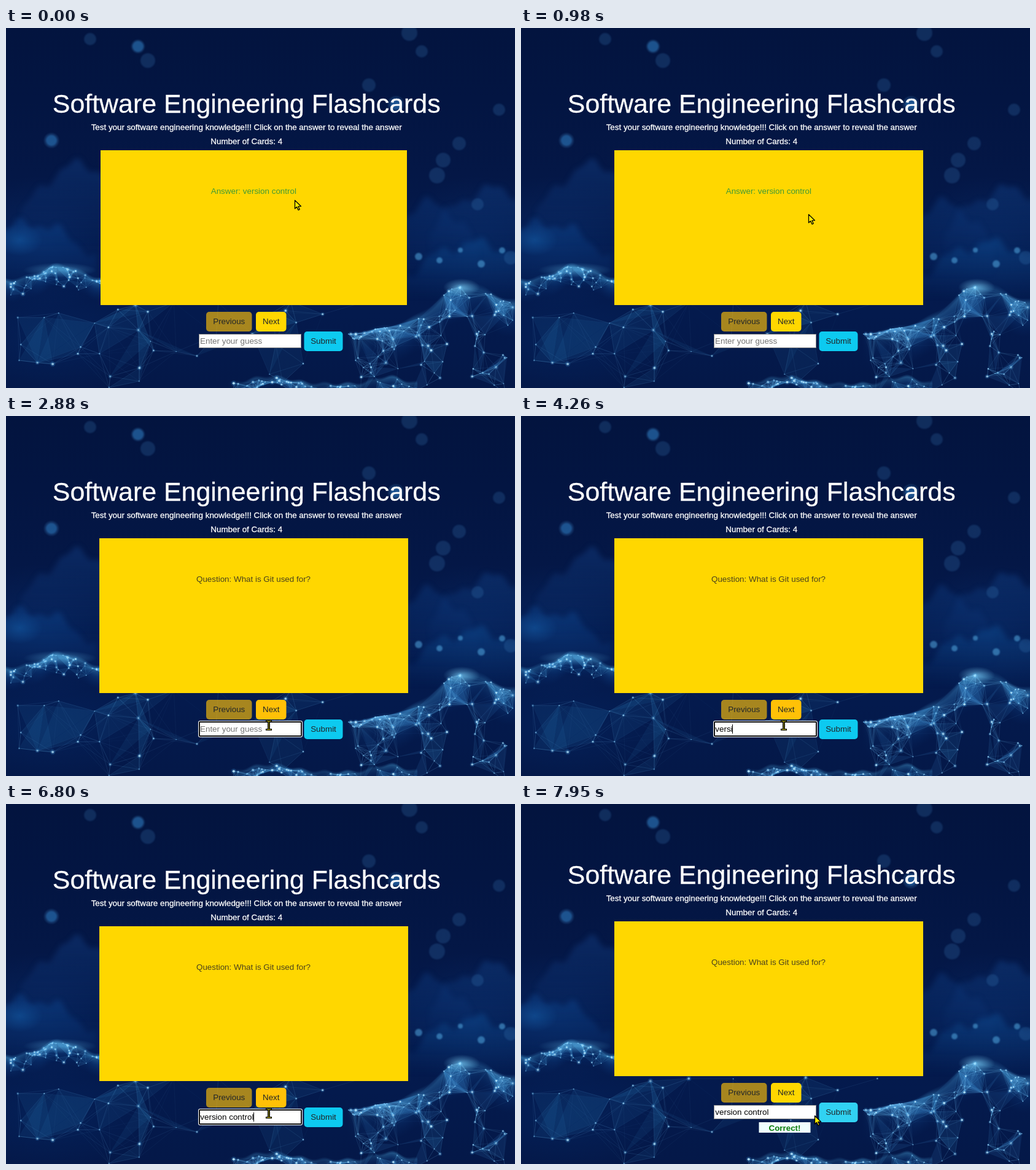
Write an HTML page with a canvas that moves like this. It is 829 by 586 pixels and loops after 8000 ms.

```html
<!DOCTYPE html>
<html lang="en">
<head>
<meta charset="utf-8">
<title>Software Engineering Flashcards</title>
<style>
html, body { margin: 0; width: 100%; height: 100%; overflow: hidden; background: #03153f; }
canvas { display: block; }
</style>
</head>
<body>
<canvas id="stage" width="829" height="586"></canvas>
<script>
const W = 829, H = 586, LOOP = 8000;
const ctx = document.getElementById('stage').getContext('2d');
const FONT = '"Liberation Sans", Arial, sans-serif';
const GOLD = '#ffd700', AMBER = '#ffc107', INK = '#212529', WHITE = '#fff';
const clamp = v => Math.max(0, Math.min(1, v));
const mix = (a, b, u) => a + (b - a) * u;

// ---------- backdrop ----------
function rng(seed) {
  return () => {
    seed = (seed * 1664525 + 1013904223) >>> 0;
    return seed / 4294967296;
  };
}

function trace(g, pts) {
  g.beginPath();
  for (const p of pts) g.lineTo(...p);
}

function dot(g, x, y, r, color) {
  g.fillStyle = color;
  g.beginPath();
  g.arc(x, y, r, 0, 7);
  g.fill();
}

function haze(g, x, y, rx, ry, rgb, a) {
  g.save();
  g.translate(x, y);
  g.scale(rx, ry);
  const fill = g.createRadialGradient(0, 0, 0, 0, 0, 1);
  fill.addColorStop(0, `rgba(${rgb},${a})`);
  fill.addColorStop(1, `rgba(${rgb},0)`);
  dot(g, 0, 0, 1, fill);
  g.restore();
}

// Wave surfaces: x span, height rule, depth of the net below the crest
const bump = (x, mid, width) => Math.exp(-(((x - mid) / width) ** 2));
const waves = [
  { from: 0, to: 215, depth: 34, count: 75, reach: 20, glow: 0.5, seed: 21,
    y: x => 412 - 24 * bump(x, 88, 42) + 2 * Math.sin(x / 7) },
  { from: 555, to: 829, depth: 150, count: 125, reach: 44, glow: 0.42, seed: 8,
    y: x => mix(500, 452, (x - 555) / 274) - 48 * bump(x, 744, 58) + 2 * Math.sin(x / 9) },
  { from: 360, to: 670, depth: 24, count: 65, reach: 28, glow: 0.4, seed: 3,
    y: x => 582 - 12 * bump(x, 430, 45) - 12 * bump(x, 622, 30) + 2 * Math.sin(x / 6) }
];

function surface(g, w) {
  const depth = Math.min(w.depth, 58);
  for (let x = w.from; x < w.to; x++) {
    const y = w.y(x);
    const edge = w.from ? clamp((x - w.from) / 60) : 1;
    const a = w.glow * edge * (0.75 + 0.25 * Math.sin(x / 13 + w.seed));
    const fill = g.createLinearGradient(0, y - 5, 0, y + depth);
    fill.addColorStop(0, 'rgba(70,160,220,0)');
    fill.addColorStop(0.15, `rgba(75,170,225,${a})`);
    fill.addColorStop(0.5, `rgba(25,95,170,${a * 0.6})`);
    fill.addColorStop(1, 'rgba(10,60,130,0)');
    g.fillStyle = fill;
    g.fillRect(x, y - 5, 1, depth + 5);
  }
}

function mesh(g, seed, count, reach, alpha, place) {
  const rnd = rng(seed);
  const pts = Array.from({ length: count }, () => place(rnd));
  const gap = (p, q) => Math.hypot(p[0] - q[0], p[1] - q[1]);
  g.lineWidth = 0.8;
  pts.forEach((p, i) => {
    const near = pts.slice(0, i).filter(q => gap(p, q) < reach);
    for (const q of near) {
      g.strokeStyle = `rgba(110,185,235,${alpha * (1.1 - gap(p, q) / reach)})`;
      trace(g, [p, q]);
      g.stroke();
    }
    if (near.length > 1) {
      g.fillStyle = `rgba(60,150,215,${alpha * 0.25})`;
      trace(g, [p, near[0], near[1]]);
      g.fill();
    }
  });
  for (const [x, y] of pts) {
    const r = 0.6 + 1.6 * rnd() ** 2;
    dot(g, x, y, r * 2, 'rgba(70,165,235,.22)');
    dot(g, x, y, r, `rgba(185,232,255,${0.4 + rnd() * 0.5})`);
  }
}

// Soft distant range with a rough top
function range(g, x0, x1, top, height, rgb, seed) {
  const pts = [[x0, top + height]];
  for (let x = x0; x <= x1; x += 8) {
    const arch = Math.sin(Math.PI * (x - x0) / (x1 - x0));
    pts.push([x, top + height * (1 - arch) * 0.6 + 8 * Math.sin(x / 11 + seed) + 5 * Math.sin(x / 5)]);
  }
  pts.push([x1, top + height]);
  const fill = g.createLinearGradient(0, top, 0, top + height);
  fill.addColorStop(0, `rgba(${rgb},.42)`);
  fill.addColorStop(1, `rgba(${rgb},0)`);
  g.filter = 'blur(4px)';
  g.fillStyle = fill;
  trace(g, pts);
  g.fill();
  g.filter = 'none';
}

function paintBackdrop() {
  const c = document.createElement('canvas');
  c.width = W;
  c.height = H;
  const g = c.getContext('2d');
  const sky = g.createLinearGradient(0, 0, 0, H);
  ['#03143f', '#031542', '#041746', '#04194b', '#041a4d', '#041848']
    .forEach((s, i) => sky.addColorStop(i / 5, s));
  g.fillStyle = sky;
  g.fillRect(0, 0, W, H);

  for (const x of [60, 770]) haze(g, x, 350, 150, 110, '12,60,130', 0.3);
  haze(g, 22, 345, 38, 26, '25,105,180', 0.5);
  haze(g, 70, 510, 170, 90, '5,45,110', 0.35);
  range(g, 25, 215, 222, 130, '20,65,135', 1);
  range(g, -70, 150, 318, 100, '16,75,150', 3);
  range(g, 690, 900, 262, 110, '18,65,135', 2);
  range(g, 610, 770, 285, 120, '14,58,125', 5);
  range(g, 650, 880, 350, 90, '16,80,150', 4);

  // Out-of-focus lights
  const lights = [
    [137, 18], [215, 30], [231, 53], [657, 8], [677, 38], [591, 93], [74, 183],
    [635, 124], [803, 133], [738, 188], [712, 215], [702, 240], [768, 287], [822, 374]
  ];
  g.filter = 'blur(1px)';
  lights.forEach(([x, y], i) => dot(g, x, y, 10 + i % 4, 'rgba(60,125,190,.24)'));
  for (const [x, y] of [[215, 30], [74, 183], [635, 124]]) dot(g, x, y, 9, 'rgba(50,145,220,.38)');
  for (let i = 0; i < 5; i++)
    dot(g, 672 + i * 34, 372 + 12 * Math.sin(i * 2.6), 6 - i % 3, 'rgba(90,180,235,.5)');
  g.filter = 'none';

  mesh(g, 11, 38, 90, 0.32, r => [r() * 600, 440 + r() * 146]);
  for (const w of waves) {
    surface(g, w);
    mesh(g, w.seed, w.count, w.reach, 0.45, r => {
      const x = mix(w.from, w.to, r());
      return [x, w.y(x) + w.depth * r() ** 2.2];
    });
  }
  haze(g, 742, 422, 30, 14, '130,215,255', 0.6);
  haze(g, 88, 394, 60, 12, '110,205,250', 0.4);
  return c;
}

// ---------- interface ----------
function text(str, x, y, color, size = 13.4, align = 'center', weight = '') {
  ctx.font = `${weight} ${size}px ${FONT}`;
  ctx.textAlign = align;
  ctx.fillStyle = color;
  ctx.fillText(str, x, y);
  if (color === WHITE) {
    ctx.strokeStyle = color;
    ctx.lineWidth = 0.3;
    ctx.strokeText(str, x, y);
  }
}

function rect(x, y, w, h, color, r = 0) {
  ctx.fillStyle = color;
  ctx.beginPath();
  ctx.roundRect(x, y, w, h, r);
  ctx.fill();
}

function button(label, x, y, w, color, alpha = 1) {
  ctx.globalAlpha = alpha;
  rect(x, y, w, 32, color, 5);
  ctx.globalAlpha = 1;
  text(label, x + w / 2, y + 20, INK);
}

const WORD = 'version control';
const FLIP = 1260, FOCUS = 2020, TYPE = 3160, TYPED = 6260, LEAVE = 6950, BLUR = 7250, SOLVED = 7490;
const STROKE = (TYPED - TYPE) / (WORD.length - 1);

function caretOn(t) {
  const since = t < TYPE ? FOCUS + 300 : TYPED;
  return t >= FOCUS + 300 && t < BLUR && (t - since < 550 || t - since > 1100);
}

function drawInput(t) {
  const focused = t >= FOCUS && t < BLUR;
  if (focused) {
    rect(313, 496, 170, 27, WHITE, 3);
    rect(314, 497, 168, 25, '#101010', 2);
    rect(316, 499, 164, 21, WHITE);
  } else {
    rect(314, 498, 167, 23, '#858585');
    rect(315, 499, 165, 21, WHITE);
  }
  const count = t < TYPE ? 0 : Math.floor((t - TYPE) / STROKE + 1.001);
  const typed = WORD.slice(0, count);
  if (typed) text(typed, 316.3, 513.5, '#000', 13.4, 'left');
  else text('Enter your guess', 316, 513.5, '#757575', 13.4, 'left');
  if (caretOn(t)) rect(Math.floor(316.3 + ctx.measureText(typed).width), 502, 1, 15, '#000');
}

function outline(pts) {
  trace(ctx, pts);
  ctx.closePath();
  ctx.lineJoin = 'round';
  ctx.lineWidth = 1.3;
  ctx.strokeStyle = '#000';
  ctx.fillStyle = '#ffee00';
  ctx.fill();
  ctx.stroke();
}

const cursors = {
  arrow() {
    outline([[0.5, 0.5], [0.5, 14], [3.6, 11.2], [6, 16.3], [8.2, 15.3], [6, 10.4], [10.5, 10.2]]);
  },
  beam() {
    for (const y of [-8, 6]) rect(-5, y, 10, 3, '#000');
    rect(-2, -7, 4, 15, '#000');
    rect(-0.5, -7, 1, 15, '#c8bc00');
    for (const y of [-7, 7]) rect(-4, y, 8, 1, '#c8bc00');
  },
  hand() {
    outline([[4, 1], [6.5, 1], [6.8, 6], [11.6, 7], [13.4, 8.5], [13.5, 12], [11.8, 18.5], [4.8, 18.5], [1, 11.5], [1, 9.5], [4, 11]]);
    for (const x of [6.4, 9.2]) rect(x, 6.5, 1, 3.5, '#000');
  }
};

function pointer(t) {
  if (t >= 7950) return ['arrow', 478, 507];
  if (t >= LEAVE) return ['hand', 498, 515];
  if (t >= FOCUS) return ['beam', 428, 503];
  const settle = clamp(t / 270);
  const step = t < 1510 ? 0 : clamp(Math.floor((t - 1390) / 120) / 4);
  const glide = 1 - (1 - step) ** 1.35;
  return ['arrow', mix(470 - 2 * settle, 427, glide), mix(280 + 23 * settle, 490, glide)].map(v => +v ? Math.round(v) : v);
}

// Click ripple closing in on the pointer
function ripple(t) {
  if (t < 710 || t >= 980) return;
  ctx.beginPath();
  ctx.arc(467, 302, t < 830 ? 91 : 54, 0, 7);
  for (const [width, color] of [[4, WHITE], [2.4, '#777785']]) {
    ctx.lineWidth = width;
    ctx.strokeStyle = color;
    ctx.stroke();
  }
}

const backdrop = paintBackdrop();

function draw(t) {
  ctx.drawImage(backdrop, 0, 0);
  const solved = t >= SOLVED;

  ctx.save();
  if (solved) ctx.translate(0, -8);
  text('Software Engineering Flashcards', 391.7, 138, WHITE, 42.9);
  text('Test your software engineering knowledge!!! Click on the answer to reveal the answer', 391.7, 165.7, WHITE);
  text('Number of Cards: 4', 391.7, 189, WHITE);

  const inset = Math.round(2 * (1 - clamp(t / 270)));
  rect(152 + inset, 199, 503 - 2 * inset, 252, GOLD);
  if (t < FLIP) text('Answer: version control', 403.3, 269.5, '#409a35');
  else text('Question: What is Git used for?', 403, 269.5, '#4b421c');

  button('Previous', 326, 462, 74.5, AMBER, 0.65);
  button('Next', 407, 462, 49.5, t >= FLIP && !solved ? AMBER : GOLD);
  drawInput(t);
  button('Submit', 485.5, 494, 63, t >= 7100 ? '#31d2f2' : '#0dcaf0');
  if (solved) {
    rect(387.5, 526, 84, 17, '#f0ffff');
    text('Correct!', 429.5, 539.7, '#0a7d0a', 13.4, 'center', 'bold');
  }
  ctx.restore();

  ripple(t);
  const [kind, x, y] = pointer(t);
  ctx.save();
  ctx.translate(x, y);
  cursors[kind]();
  ctx.restore();
}

const start = performance.now();
function tick() {
  draw((performance.now() - start) % LOOP);
  requestAnimationFrame(tick);
}
tick();
</script>
</body>
</html>
```
